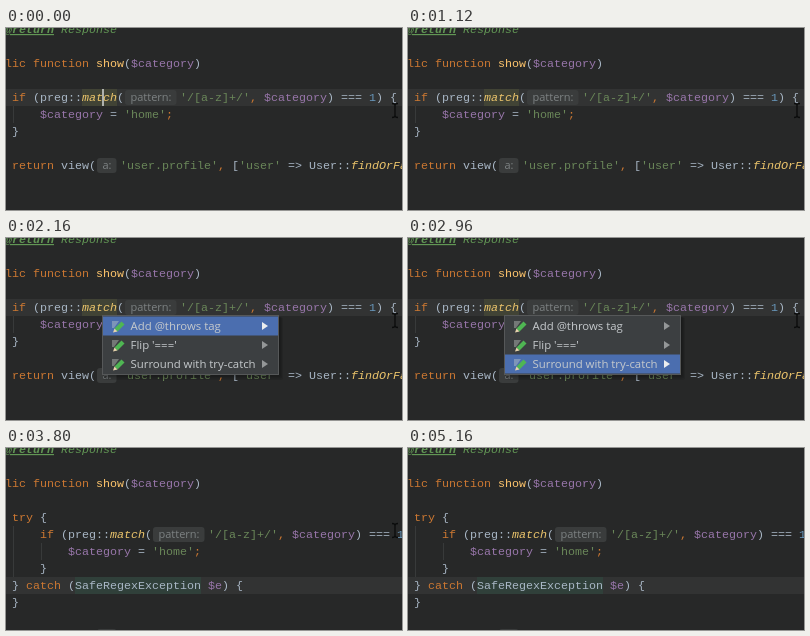
Recreate the animation shown at these times as an HTML page. Size 396 px wide and 182 px high, loop 5200 ms.

```html
<!DOCTYPE html>
<html lang="en">
<head>
<meta charset="utf-8">
<title>Surround with try-catch</title>
<style>
  html, body { margin: 0; width: 100%; height: 100%; overflow: hidden; background: #272828; }
  svg { display: block; width: 100%; height: 100%; }
  text { white-space: pre; }
  .code { font: 11.667px "Liberation Mono", monospace; }
  .slant { font-style: italic; }
  .tag { font-weight: bold; text-decoration: underline; }
  .ui { font: 11.4px "Open Sans", sans-serif; }
  .hint { font: 11px "Open Sans", sans-serif; }
</style>
</head>
<body>
<svg id="stage" viewBox="0 0 396 182"></svg>
<script>
const NS = 'http://www.w3.org/2000/svg';
const LOOP = 5200, CHAR = 7, LINE = 17, TOP = 5, BLINK = 720;
const OPEN = 1560, SECOND = 2480, THIRD = 2720, WRAP = 3160, POINTER_OUT = 4800;
const INK = {
  p: '#a9b7c6', k: '#cc7832', v: '#9876aa', s: '#6a8759', n: '#6897bb',
  f: '#ffc66d', m: '#ecc56c', d: '#629755', t: '#629755'
};
const STYLE = { m: 'code slant', d: 'code slant', t: 'code slant tag' };
const stage = document.getElementById('stage');

function add(parent, tag, attrs = {}, text) {
  const el = document.createElementNS(NS, tag);
  for (const key in attrs) el.setAttribute(key, attrs[key]);
  if (text !== undefined) el.textContent = text;
  parent.append(el);
  return el;
}
const group = (parent = stage) => add(parent, 'g');
const rect = (parent, x, y, width, height, fill, more) =>
  add(parent, 'rect', { x, y, width, height, fill, ...more });
const show = (el, on) => el.setAttribute('visibility', on ? 'visible' : 'hidden');
const baseline = row => TOP + row * LINE;

function hint(parent, x, y, label, space) {
  rect(parent, x + 1, y - 11, space - 4.5, 15, '#3a3c3c', { rx: 3 });
  add(parent, 'text', { x: x + 6.5, y: y - .5, fill: '#7d8283', class: 'hint' }, label);
}

// Tokens are [ink, text]; parameter hints are ['hint', text, space].
function code(parent, row, x, tokens) {
  const y = baseline(row);
  for (const [ink, text, space] of tokens) {
    if (ink === 'hint') {
      hint(parent, x, y, text, space);
      x += space;
    } else {
      add(parent, 'text', { x, y, fill: INK[ink], class: STYLE[ink] || 'code' }, text);
      x += text.length * CHAR;
    }
  }
}

function condition(parent, row, x) {
  code(parent, row, x, [
    ['k', 'if '], ['p', '(preg::'], ['m', 'match'], ['p', '('], ['hint', 'pattern:', 56],
    ['s', "'/[a-z]+/'"], ['k', ', '], ['v', '$category'], ['p', ') === '], ['n', '1'], ['p', ') {']
  ]);
  code(parent, row + 1, x + 4 * CHAR, [['v', '$category'], ['p', ' = '], ['s', "'home'"], ['k', ';']]);
  code(parent, row + 2, x, [['p', '}']]);
}

function result(parent, row) {
  code(parent, row, 6, [
    ['k', 'return '], ['p', 'view('], ['hint', 'a:', 24], ['s', "'user.profile'"], ['k', ', '],
    ['p', '['], ['s', "'user'"], ['p', ' => User::'], ['m', 'findOrFail'], ['p', '(']
  ]);
}

const currentLine = (parent, row) => rect(parent, 0, baseline(row) - 12, 396, LINE, '#323333');
const guide = (parent, x, row, rows) =>
  rect(parent, x, baseline(row) - 12, 1, rows * LINE, '#383a3a');
const caretAt = (parent, x, row) => rect(parent, x - .75, baseline(row) - 12, 1.5, LINE, '#d4d6d6');

rect(stage, 0, 0, 396, 182, '#272828');
code(stage, 0, -1, [['t', '@return'], ['d', ' Response']]);
code(stage, 2, -1, [['k', 'lic function '], ['f', 'show'], ['p', '('], ['v', '$category'], ['p', ')']]);

const before = group();
currentLine(before, 4);
rect(before, 76, 61, 35, LINE, '#414335');
guide(before, 7, 5, 1);
condition(before, 4, 6);
result(before, 8);
const caretBefore = caretAt(before, 97, 4);

const after = group();
currentLine(after, 8);
rect(after, 69, 129, 126, LINE, '#30403a');
guide(after, 7, 5, 3);
guide(after, 35, 6, 1);
code(after, 4, 6, [['k', 'try '], ['p', '{']]);
condition(after, 5, 34);
code(after, 8, 6, [['p', '} '], ['k', 'catch '], ['p', '(SafeRegexException '], ['v', '$e'], ['p', ') {']]);
code(after, 9, 6, [['p', '}']]);
result(after, 11);
const caretAfter = caretAt(after, 69, 8);

function pencil(parent, y) {
  const g = add(parent, 'g', { transform: `translate(106 ${y - 6})` });
  add(g, 'path', { d: 'M0 1H7L2 8H0Z', fill: '#c9cfc8', opacity: .4 });
  add(g, 'path', { d: 'M2.500 8.500L9.500 1.500L12.500 4.500L5.500 11.500Z', fill: '#4fb653' });
  add(g, 'path', { d: 'M2.500 8.500L5.500 11.500L1 12.500Z', fill: '#e6d3ac' });
}

const menu = group();
for (let i = 4; i > 0; i--) rect(menu, 97, 79, 176 + i, 57 + i * 1.5, '#000', { opacity: .1, rx: 2 });
rect(menu, 96.5, 77.5, 176, 59, '#3c3f41', { stroke: '#565859' });
const items = ['Add @throws tag', "Flip '==='", 'Surround with try-catch'].map((label, i) => {
  const y = 88 + i * 19;
  const bar = rect(menu, 97, y - 9.5, 175, 19, '#4b6eaf');
  pencil(menu, y);
  add(menu, 'text', { x: 124.5, y: y + 3.8, fill: '#c5c9cc', class: 'ui' }, label);
  const arrow = add(menu, 'path', { d: `M256 ${y - 4}l6 4l-6 4z` });
  return { bar, arrow };
});

const pointer = add(stage, 'path', {
  d: 'M386 75.500q3 0 3 2v10q0 2 -3 2M392 75.500q-3 0 -3 2v10q0 2 3 2',
  fill: 'none', stroke: '#0b0c0c', 'stroke-width': 1.3
});

const blink = t => t % BLINK < BLINK / 2;

function draw(t) {
  const wrapped = t >= WRAP;
  const open = t >= OPEN && !wrapped;
  const choice = t < SECOND ? 0 : t < THIRD ? 1 : 2;
  before.style.display = wrapped ? 'none' : '';
  after.style.display = wrapped ? '' : 'none';
  menu.style.display = open ? '' : 'none';
  items.forEach(({ bar, arrow }, i) => {
    show(bar, i === choice);
    arrow.setAttribute('fill', i === choice ? '#eceeef' : '#949798');
  });
  show(caretBefore, t < OPEN && blink(t));
  show(caretAfter, wrapped && blink(t - WRAP));
  show(pointer, t < POINTER_OUT);
}

function tick() {
  draw(performance.now() % LOOP);
  requestAnimationFrame(tick);
}
tick();
</script>
</body>
</html>
```
